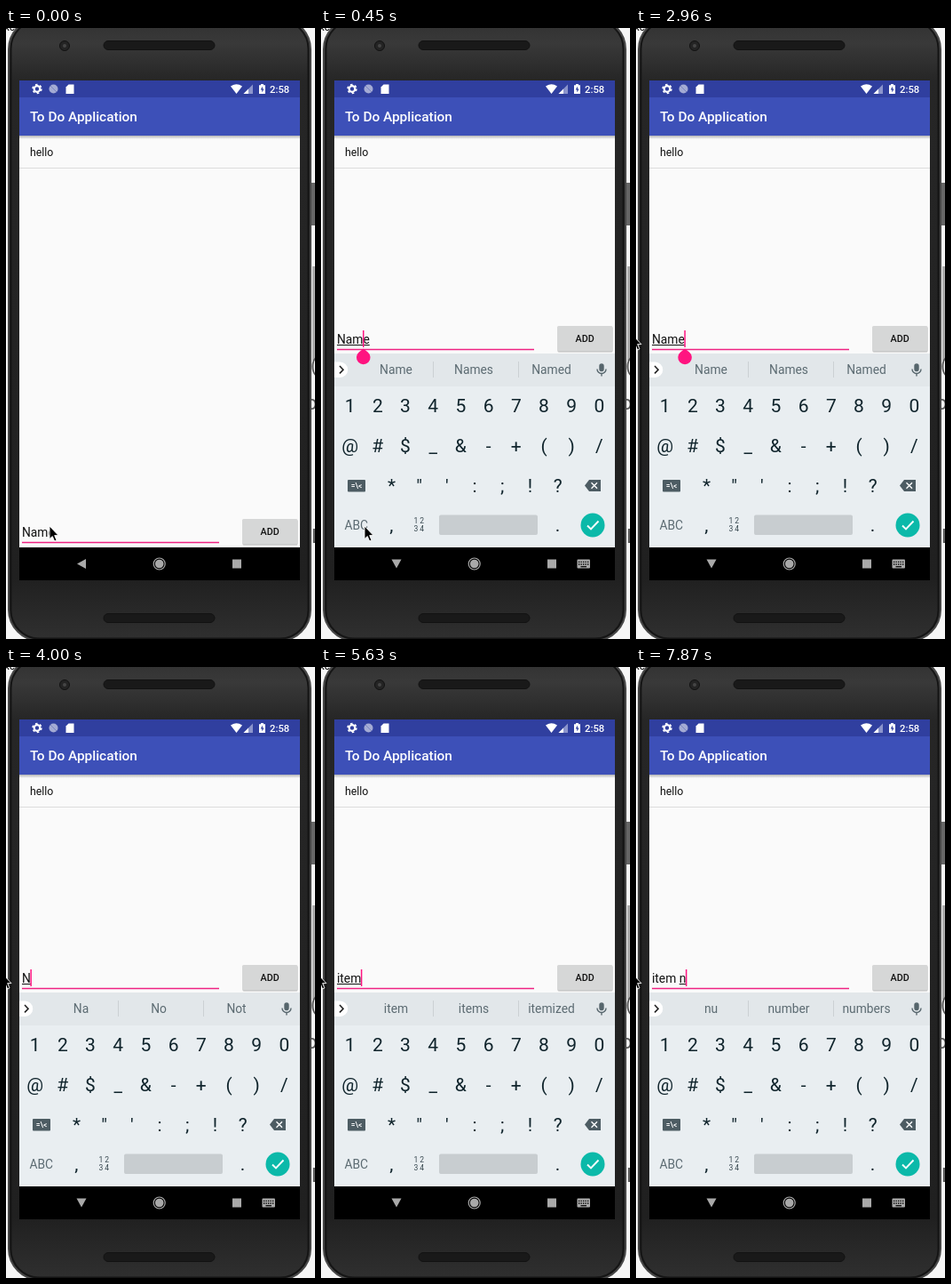
Recreate the animation shown at these times as an HTML page. Size 348x687 px, loop 8000 ms.

```html
<!DOCTYPE html>
<html lang="en">
<head>
<meta charset="utf-8">
<title>To Do Application</title>
<style>
  html, body { margin: 0; width: 100%; height: 100%; overflow: hidden; background: #f6f6f6; }
  svg { display: block; width: 348px; height: 687px; }
  text { font-family: Roboto, sans-serif; white-space: pre; }
  .mid { text-anchor: middle; }
  .bold { font-weight: 500; }
  #keys text { font-size: 21px; fill: #10242c; }
  #keys .hint { font-size: 13.8px; fill: #5c6b72; }
  #keys .tiny { font-size: 8.5px; letter-spacing: 2px; fill: #37474f; }
</style>
</head>
<body>
<svg viewBox="0 0 348 687">
  <defs>
    <linearGradient id="shell" x2="0" y2="1">
      <stop stop-color="#303030"/><stop offset=".04" stop-color="#393939"/>
      <stop offset=".1" stop-color="#262626"/><stop offset=".9" stop-color="#202020"/>
      <stop offset="1" stop-color="#303030"/>
    </linearGradient>
    <linearGradient id="shade" x2="0" y2="1">
      <stop stop-color="#000" stop-opacity=".28"/><stop offset="1" stop-color="#000" stop-opacity="0"/>
    </linearGradient>
    <clipPath id="screen"><path d="M15 59H331V584H15Z"/></clipPath>
  </defs>

  <!-- desktop behind the phone -->
  <text x="-2" y="3" font-size="12">xcc</text>
  <path d="M344 174h4v48h-4z" fill="#666"/>
  <path d="M345 268h3v106h-3z" fill="#aaa"/>
  <g fill="#555" font-size="22"><text x="343" y="387">(</text><text x="338" y="429">o</text><text x="344" y="579">L</text></g>

  <!-- phone -->
  <rect x="3" y="-11" width="340" height="700" rx="35" fill="url(#shell)" stroke="#484848" stroke-width="2"/>
  <rect x="5.5" y="-8.5" width="335" height="695" rx="32" fill="none" stroke="#151515" stroke-width="2"/>
  <g fill="#191919" stroke="#121212">
    <rect x="110" y="14.500" width="125" height="10" rx="5"/>
    <rect x="110" y="658.500" width="125" height="10" rx="5"/>
    <circle cx="66" cy="20" r="5.500" fill="#242424"/>
  </g>
  <circle cx="66" cy="20" r="2" fill="#454545"/>

  <!-- app -->
  <path d="M15 59H331V621H15Z" fill="#fafafa"/>
  <path d="M15 59H331V78H15Z" fill="#303f9f"/>
  <path d="M15 78H331V121H15Z" fill="#3d50b8"/>
  <path d="M15 121H331V125H15Z" fill="url(#shade)"/>
  <g fill="#fff">
    <circle cx="35" cy="68.500" r="3.300" fill="none" stroke="#fff" stroke-width="2.200"/>
    <circle cx="35" cy="68.500" r="4.900" fill="none" stroke="#fff" stroke-width="1.600" stroke-dasharray="2.560"/>
    <circle cx="53.500" cy="68.500" r="5" fill="#a4abd4"/>
    <path d="M50 65l7 7" stroke="#7c86c2"/>
    <path d="M70.500 63.500H76.500V74H67.500V66.500Z"/>
    <path d="M253 65.500Q259.500 61 266 65.500L259.500 74Z"/>
    <path d="M278 63.500V74H267.500Z" fill="#8b94cc"/>
    <path d="M273 68.500V74H267.500Z"/>
    <path d="M287 63h3v1.200h2V74h-7V64.200h2z"/>
    <path d="M289 65.500l-2.300 4h1.600v3l2.300-4H289z" fill="#303f9f"/>
    <text x="297" y="72.500" font-size="11.300" class="bold">2:58</text>
    <text x="27" y="105" font-size="15.400" class="bold">To Do Application</text>
  </g>
  <text x="27" y="143.500" font-size="12.300" fill="#111">hello</text>
  <path d="M15 157.500H331" stroke="#dcdcdc"/>

  <g clip-path="url(#screen)">
    <g id="field">
      <path d="M18 361.500H240" stroke="#ee2382" stroke-width="1.700"/>
      <text id="typed" x="18" y="355" font-size="13.800" fill="#111"></text>
      <path id="underline" stroke="#111"/>
      <path id="caret" d="M0 340V359" stroke="#ff1480" stroke-width="1.500"/>
      <rect x="266.500" y="336" width="62" height="28.500" rx="1.500" fill="#bbb"/>
      <rect x="266" y="335" width="62.500" height="28.500" rx="1.500" fill="#d6d7d7"/>
      <text x="297.200" y="353" font-size="10.750" class="mid bold" fill="#111">ADD</text>
    </g>
    <g id="keyboard">
      <path d="M15 366H331V584H15Z" fill="#e9eef1"/>
      <path d="M15 366H331V403H15Z" fill="#e2e7ea"/>
      <path d="M126.500 375V393M222.500 375V393" stroke="#cbd1d4"/>
      <path d="M15 375.500h6.500a8.700 8.700 0 0 1 0 17.400H15z" fill="#fff"/>
      <path d="M21 380l4 4.200-4 4.200" fill="none" stroke="#222" stroke-width="1.600"/>
      <g fill="none" stroke="#56656c" stroke-width="1.400">
        <rect x="314" y="378" width="4" height="7.500" rx="2" fill="#56656c"/>
        <path d="M311 383.500a5 5 0 0 0 10 0M316 388.500v3"/>
      </g>
      <g id="keys">
        <g id="hints"></g>
        <text x="26.500" y="563.500" class="hint">ABC</text>
        <text x="104.500" y="557" class="tiny">12</text>
        <text x="104.500" y="566" class="tiny">34</text>
      </g>
      <rect x="30" y="508" width="20" height="13.500" rx="1" fill="#4d5c63"/>
      <text x="40" y="518" font-size="8.500" class="mid bold" fill="#fff">=\&lt;</text>
      <path d="M297 514.500l5-6.500h13v13h-13z" fill="#4d5c63"/>
      <path d="M304.500 511.200l6.500 6.500M311 511.200l-6.500 6.500" stroke="#fff" stroke-width="1.400"/>
      <rect x="133" y="547.500" width="111" height="22.500" rx="2" fill="#c8cdd0"/>
      <circle cx="306" cy="559" r="13.500" fill="#0bb9a9"/>
      <path d="M300 559.500l4 4 8.500-9" fill="none" stroke="#fff" stroke-width="1.900"/>
    </g>
    <path id="handle" d="M0 360.500l5 4a7.800 7.800 0 1 1-10 0z" fill="#ff1480"/>
  </g>

  <!-- navigation bar -->
  <path d="M15 584H331V621H15Z" fill="#000"/>
  <g fill="#a9a9a9">
    <path id="back" d="M80 602.500L90 597V608Z"/>
    <circle cx="172.700" cy="602.500" r="4.800"/>
    <circle cx="172.700" cy="602.500" r="6.500" fill="none" stroke="#a9a9a9" stroke-width="1.200"/>
    <path d="M255 597.500h10v10h-10z"/>
    <g id="switcher">
      <rect x="288.500" y="597.500" width="14.500" height="10" rx="1"/>
      <path d="M290 600.300h12M290 603h12" stroke="#000" stroke-width="1.300" stroke-dasharray="1.300 1.200"/>
      <path d="M292.500 605.700h6.500" stroke="#000" stroke-width="1.200"/>
    </g>
  </g>
  <path id="pointer" d="M0 0V14.500L3.300 11.500 5.700 17 8 16 5.700 10.600H10Z" stroke="#fff" stroke-width=".9"/>
</svg>

<script>
const $ = id => document.getElementById(id);
const LOOP = 8000, CENTERS = [84.5, 172, 259.5];

function label(parent, x, y, content, cls = '') {
  const node = document.createElementNS('http://www.w3.org/2000/svg', 'text');
  node.setAttribute('x', x);
  node.setAttribute('y', y);
  node.setAttribute('class', 'mid ' + cls);
  node.textContent = content;
  return parent.appendChild(node);
}

['1234567890', '@#$_&-+()/', ' *"\':;!? ', ' ,    . '].forEach((row, r) =>
  [...row].forEach((key, i) => {
    if (key === ' ') return;
    const column = r < 2 ? i : r === 2 ? i + .5 : i === 1 ? 1.5 : 7.5;
    label($('keys'), 32.6 + 31.2 * column, [432, 477, 522, 566][r], key);
  }));
const hints = CENTERS.map(x => label($('hints'), x, 389.3, '', 'hint'));

// Each step changes part of the state. at: caret index, from: start of the underlined word,
// lift: keyboard progress, handle: index of the drag handle or -1.
const type = (text, words, from = 0) =>
  ({ text, from, at: text.length, on: 1, handle: -1, ...(words && { words }) });
const move = (x, y) => ({ x, y });
const steps = [
  [0, { ...type('Name', 'Name Names Named', 4), on: 0, lift: 0, ...move(49, 560) }],
  [150, { lift: .4 }],
  [300, { lift: 1, from: 0 }],
  [450, { at: 3, on: 1, handle: 3 }],
  [750, { on: 0 }],
  [1050, { on: 1 }],
  [1200, move(66, 490)],
  [1340, move(95, 370)],
  [1490, { ...move(104, 322), on: 0 }],
  [1630, move(77, 345)],
  [1930, move(79, 345)],
  [2080, { handle: -1, on: 1 }],
  [2220, { at: 4, handle: 4 }],
  [2370, move(74, 346)],
  [2520, { ...move(56, 347), on: 0 }],
  [2670, move(34, 347)],
  [2810, move(12, 346)],
  [2960, { ...move(-4, 345), on: 1 }],
  [3260, { on: 0 }],
  [3410, move(-4, 309)],
  [3560, move(-4, 345)],
  [3710, type('Nam', 'Name Names Named')],
  [3850, type('Na', 'Na Name Not')],
  [4000, type('N', 'Na No Not')],
  [4150, type('')],
  [4300, { words: "I The I'm" }],
  [4750, { on: 0 }],
  [5190, type('i', 'I in is')],
  [5340, type('it', 'it its if')],
  [5480, type('ite', 'item items iterate')],
  [5630, type('item', 'item items itemized')],
  [6080, type('item ', '', 5)],
  [6230, { words: 'is and the' }],
  [6530, type('item n', 'no now not', 5)],
  [6830, type('item nu', 'nu number numbers', 5)],
  [6980, type('item num', 'num number numbers', 5)],
  [7130, type('item numb', 'numb number numbers', 5)],
  [7570, type('item num', '', 5)],
  [7720, type('item nu', 'num number numbers', 5)],
  [7870, type('item n', 'nu number numbers', 5)],
];

const shift = (id, x, y) => $(id).setAttribute('transform', `translate(${x} ${y})`);
const show = (id, visible) => $(id).setAttribute('visibility', visible ? 'visible' : 'hidden');
const edge = n => 18 + (n > 0 ? $('typed').getSubStringLength(0, n) : 0);

function draw(time) {
  const s = Object.assign({}, ...steps.filter(([start]) => start <= time).map(step => step[1]));
  $('typed').textContent = s.text;
  $('underline').setAttribute('d', `M${edge(s.from)} 356.5H${edge(s.text.length)}`);
  show('underline', s.from < s.text.length);
  shift('caret', edge(s.at) + .3, 0);
  show('caret', s.on);
  shift('handle', edge(s.handle) + .3, 0);
  show('handle', s.handle >= 0);
  s.words.split(' ').forEach((word, i) => hints[i].textContent = word);
  shift('field', 0, s.lift < 1 ? 217 : 0);
  shift('keyboard', 0, 218 * (1 - s.lift));
  $('back').setAttribute('transform', s.lift ? 'rotate(-90 85 602.5)' : '');
  show('switcher', s.lift);
  shift('pointer', s.x, s.y);
}

function tick(now) {
  draw(now % LOOP);
  requestAnimationFrame(tick);
}
draw(0);
requestAnimationFrame(tick);
</script>
</body>
</html>
```
